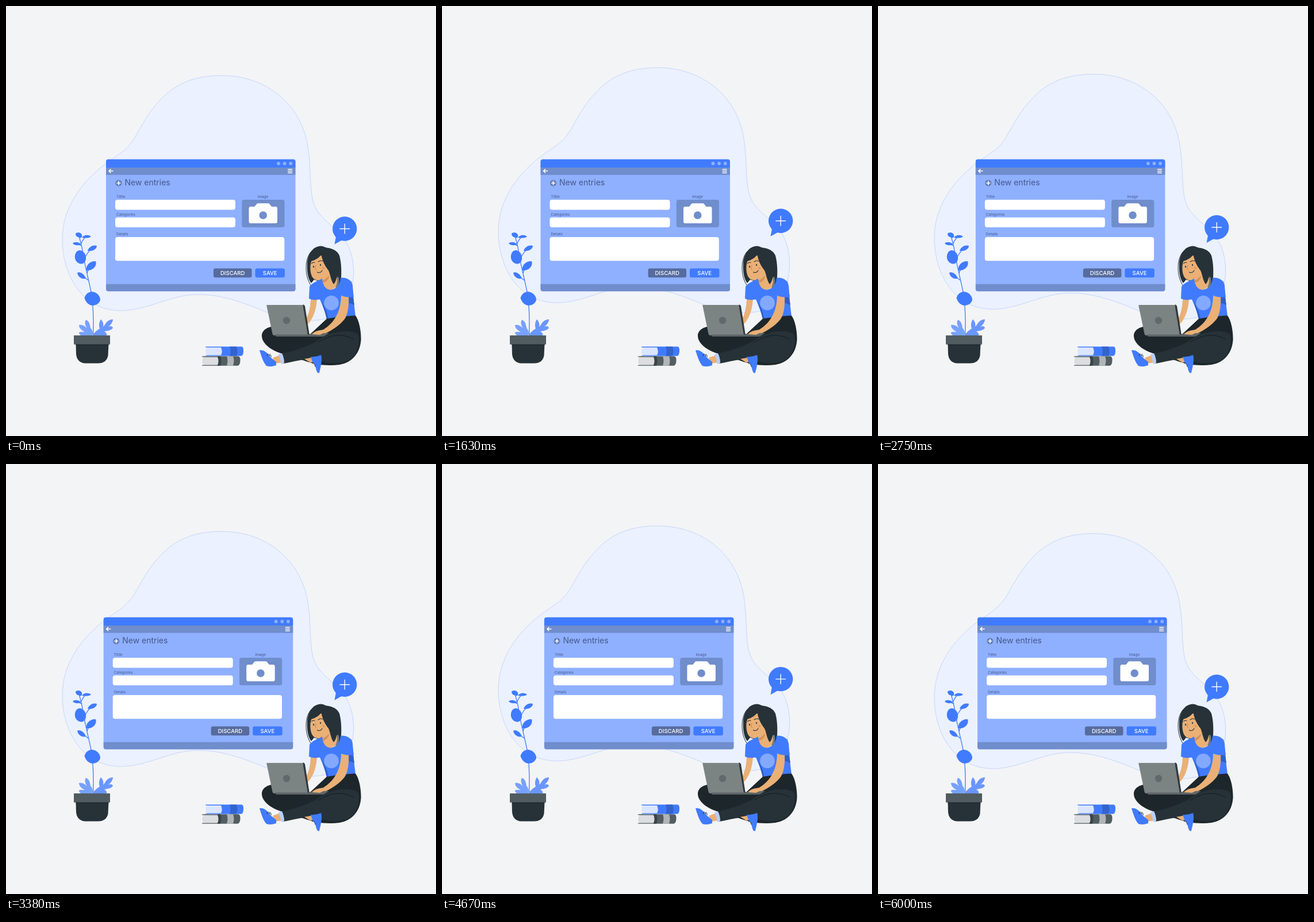
Animation, 748 px wide and 748 px high, one loop 6040 ms. Source, as an HTML page:

```html
<!DOCTYPE html>
<html lang="en">
<head>
<meta charset="utf-8">
<title>New entries</title>
<style>
html, body { margin: 0; width: 100%; height: 100%; overflow: hidden; background: #f3f4f6; }
svg { display: block; width: 100vw; height: 100vh; }
text { font-family: Inter, "Open Sans", sans-serif; }
.label { font-size: 6.4px; fill: #45578a; }
.button { font-size: 9.6px; fill: #fff; text-anchor: middle; font-weight: 500; }
.blue { fill: #407bff; }
.dark { fill: #263238; }
.skin { fill: #eab076; }
.slate { fill: #708dcc; }
.white { fill: #fff; }
.line { fill: none; stroke-linecap: round; stroke-linejoin: round; }
</style>
</head>
<body>
<svg viewBox="0 0 748 748">
  <ellipse cx="374" cy="626" rx="286" ry="16" fill="#f3f4f5"/>

  <path id="blob" fill="#ebf1fe" stroke="#a9c2fb" stroke-width=".6" d="M375 121C455 121 514 173 525 244C532 290 527 325 537 348C548 375 583 387 597 421C611 456 605 500 585 527C560 557 495 549 452 532C400 510 365 501 330 502C285 503 245 530 199 530C130 529 98 465 98 406C98 350 132 305 175 273C200 255 212 250 225 227C242 198 250 180 280 152C305 131 335 121 375 121Z"/>

  <g id="panel">
    <rect x="174" y="266.7" width="329.5" height="229.6" rx="4" fill="#8eb0ff"/>
    <path class="blue" d="M174 281V270.7Q174 266.7 178 266.7H499.5Q503.5 266.7 503.5 270.7V281Z"/>
    <g fill="#8eb0ff"><circle cx="474" cy="274" r="2.9"/><circle cx="484.6" cy="274" r="2.9"/><circle cx="495.2" cy="274" r="2.9"/></g>
    <path class="slate" d="M174 281H503.5V293.7H174ZM174 483.8H503.5V492.3Q503.5 496.3 499.5 496.3H178Q174 496.3 174 492.3Z"/>
    <path class="line" stroke="#fff" stroke-width="1.6" d="M186 287H179.5M182 284.2L179 287L182 289.8M490.8 284.2H497.5M490.8 287.2H497.5M490.8 290.2H497.5"/>
    <circle cx="196" cy="308" r="5.6" fill="#667fb9"/>
    <path class="line" stroke="#fff" stroke-width="1.7" d="M193.2 308H198.8M196 305.2V310.8"/>
    <text x="206.5" y="312.3" font-size="14" fill="#45578a">New entries</text>
    <text class="label" x="192" y="333.6">Tittle</text>
    <text class="label" x="192" y="364.8">Categories</text>
    <text class="label" x="192" y="398.7">Details</text>
    <text class="label" x="447" y="333.6" text-anchor="middle">Image</text>
    <g class="white">
      <rect x="190" y="337" width="209" height="17.4" rx="4"/>
      <rect x="190" y="367.8" width="209" height="17.2" rx="4"/>
      <rect x="190" y="402" width="294.3" height="41.2" rx="4"/>
    </g>
    <rect class="slate" x="410.3" y="337" width="74.2" height="48" rx="4"/>
    <path class="white" d="M425.5 349H432.5L436 344.5Q437 343.3 438.5 343.3H456Q457.5 343.3 458.5 344.5L462 349H469Q472 349 472 352V375Q472 378 469 378H425.5Q422.5 378 422.5 375V352Q422.5 349 425.5 349Z"/>
    <circle class="slate" cx="447.2" cy="364" r="6.8"/>
    <rect x="361" y="456.5" width="66.5" height="15.7" rx="3" fill="#566b9e"/>
    <rect class="blue" x="433.5" y="456.5" width="51.5" height="15.7" rx="3"/>
    <text class="button" x="394.2" y="467.8">DISCARD</text>
    <text class="button" x="459.2" y="467.8">SAVE</text>
  </g>

  <!-- plant -->
  <path class="line" stroke="#407bff" stroke-width="1.3" d="M151.5 574C152.500 548 152 520 148 497C144 477 138 455 135 437C133 422 130 410 127 400M131 413Q134 405 140 401M131 417L122 413M136 441Q141 428 150 422M141 465Q143 457 148 452M143 477Q138 473 131 468"/>
  <g class="blue">
    <path d="M121 396C123 393 130 393 132 398C133 402 131 404 128 403C124 402 121 400 121 396ZM132 403C135 398 143 397 148 401C145 404 138 404 132 403ZM116 413C119 409.500 127 410 131 415C126 417 119 416.500 116 413ZM142 426C144 418 153 415 158 417C158 423 151 427 142 426Z"/>
    <path d="M140 460C138 451 147 443 156 444C159 453 150 461 140 460ZM124 464C129 461 137 467 139 474C132 476 125 471 124 464Z"/>
    <path d="M127 425C134 424 140 432 139 440C138 447 133 450 128 448C122 446 119 440 120 434C121 429 123 426 127 425ZM136.500 508C139 499 147 495 154 498C160 500 164 506 164 511C163 517 157 521 150 521C144 520 139 516 136.500 508Z"/>
  </g>
  <path fill="#78a1ff" d="M150 574H131C129 572 127 570 126.500 568C130 566 134 567 137 567C131 564 127 560 127 555C133 554 138 557 141 561C138 556 136 550 139 546C145 548 146 554 147 560C150 563 152 568 150 574Z"/>
  <path fill="#6a96ff" d="M150 574C154 567 159 564 163 561C161 556 162 549 165 545C169 549 170 554 169 558C174 554 174 546 186 545C186 550 182 555 178 558C182 556 185 557 186 560C182 565 176 565 171 566C174 568 175 570 176 572C168 575 160 573 150 574Z"/>
  <path class="dark" d="M121.5 588H178.5L177.500 608Q175 621.5 160 621.5H138Q124 621 122 606Z"/>
  <rect x="118" y="573" width="63" height="15.7" fill="#515c61"/>
  <path d="M121.5 588.7H178.5V590H121.5Z" fill="#1d272c"/>

  <!-- books -->
  <g id="blueBook">
    <path class="blue" d="M347 592.5H410Q413.5 593 413 601Q412.5 608.5 409 608.8H347V607.7H349.5Q347.5 601 349.5 593.7H347Z"/>
    <path fill="#dae5ff" d="M349 594H374Q377.5 601 374 607.5H349Q347.5 601 349 594Z"/>
    <path fill="#3463cc" d="M389 592.5H401Q404 601 401 608.8H389Q392 601 389 592.5Z"/>
  </g>
  <g id="grayBook">
    <path fill="#535e62" d="M341 609.2H404Q408 609.5 407.5 617.5Q407 625.3 403 625.7H341V624.6H343.5Q341.5 618 343.5 610.4H341Z"/>
    <path fill="#dcdddf" d="M343 610.7H368Q371.5 618 368 624.4H343Q341.5 618 343 610.7Z"/>
    <path fill="#b1b5b7" d="M384 609.2H395Q398 617 395 625.7H384Q387 617 384 609.2Z"/>
    <path fill="#394448" d="M368 609.2H373Q376 617 373 625.7H368Q371.5 617 368 609.2Z"/>
  </g>

  <g id="bubble">
    <circle class="blue" cx="589.2" cy="387.5" r="21.2"/>
    <path class="blue" d="M574 401L571.5 414.5L585 407Z"/>
    <path class="line" stroke="#fff" stroke-width="1.4" d="M580.9 387.5H597.5M589.2 379.2V395.8"/>
  </g>

  <!-- hair, neck and face -->
  <path class="dark" d="M548 417.500C534 418 526 430 524 446C523 461 525 475 531 482L536 476L562 485C571 488 579 488 582 484C584 466 584 449 580 434C575 422 561 421 556 420Q552 417.500 548 417.500Z"/>
  <path class="line" stroke="#263238" stroke-width="1" d="M531 427C520 438 518 469 531 487"/>
  <path class="skin" d="M552 472L564 462L567 474L578 472L575 487Q565 499 551 491L547 480Z"/>
  <path fill="#d2935d" d="M549 477Q556 476 561 469L562 472Q558 481 550 482Z"/>
  <path class="skin" d="M533 439C528 448 528 466 534 473C540 480 555 479 561 469C567 470 571 460 567 456C565 454 562 457 561 459C558 452 552 445 550 434Q541 434 533 439Z"/>
  <path class="dark" d="M548 427C549 443 555 452 561 460C564 466 565 477 570 484C579 477 577 441 570 431C563 425 554 422 548 427ZM552 426C548 437 538 442 531 444L527 456C526 438 538 424 552 426Z"/>
  <path class="line" stroke="#263238" stroke-width="1.1" d="M531.5 448Q534 445 537 446.500M543 445Q547 441.500 551 444M541.500 463Q547 465.500 550 460"/>
  <g class="dark"><ellipse cx="535" cy="453.5" rx="1" ry="1.7"/><ellipse cx="547" cy="450.5" rx="1" ry="1.7"/></g>
  <path class="line" stroke="#c7834d" stroke-width="1" d="M539 451Q536.500 457 539.500 459"/>
  <circle cx="552" cy="456" r="2.3" fill="#e59b66"/>

  <!-- far arm, shirt -->
  <path class="skin" d="M530 507L541 509C540 524 537 538 528 550L520 559L520 548C527 537 530 522 530 507Z"/>
  <path class="blue" d="M528 488C533 481 543 478 550 474C551 492 564 500 576 488Q582 481 582 472.500C592 472 601 476 603 486L605 515L608 540C592 541 574 542 558 545Q554 528 546 510Q536 513 527 509Z"/>
  <path fill="#2f5ec9" d="M541 505L546 510Q555 528 558 545L561 544Q557 522 541 505ZM593 505L604 507L606 520L595 516Z"/>
  <path class="line" stroke="#737980" stroke-width="3.5" stroke-linecap="butt" d="M575 489Q579 481 577 473"/>
  <circle cx="566" cy="516.5" r="12.8" fill="#83a9ff"/>

  <!-- legs -->
  <path fill="#1d272b" d="M558 544C574 541 594 539 608 538.5C615 548 618 568 617.5 581C616 603 603 620 580 624C556 627 536 623 519 617L489 607C464 602 445 588 445 574C445 563 456 557 471 557C493 558 512 565 529 571Z"/>
  <path class="dark" d="M478 605C510 598 531 590 550 577C569 565 598 562 612 571C617 583 612 604 600 614C582 625 557 622 535 614C515 614 500 619 482 622Z"/>
  <path class="line" stroke="#131b1e" stroke-width="1" d="M556 558Q575 557 583 549M543 585Q575 564 604 579"/>

  <!-- near arm -->
  <path class="skin" d="M583 502L596 505C597 523 594 540 587 547C578 557 566 565 552 571L530 574C535 567 544 564 552 563C571 551 583 532 583 502Z"/>
  <path class="blue" d="M580 502C581 488 592 477 601 479L605 506Q590 508 580 502Z"/>

  <!-- laptop -->
  <path fill="#30393d" d="M516 519.5Q519 519 520 522L528 573H521Z"/>
  <path fill="#7c8483" d="M454 520H514Q516 520 516.5 522L525 573H467Q464 573 463.5 570L453.5 522Q453 520 454 520Z"/>
  <path fill="#5d6567" d="M468 571.5H527L535 569H562L555 573.5Q553 575 550 575H470Z"/>
  <path class="skin" d="M532 571Q538 564 550 564L557 567L546 572Z"/>
  <circle cx="488" cy="547" r="6.2" fill="#62696a"/>

  <!-- feet -->
  <path class="skin" d="M464 612L477 607L481 620L468 622ZM519 614L535 611L538 619L529 620Z"/>
  <path fill="#b9ceff" d="M474 606L480 604Q484 612 484 621L479 623Q478 614 474 606Z"/>
  <path class="blue" d="M441 599C449 597 455 604 460 611Q466 616 470 619V625C464 627 458 628 453 626C448 621 444 609 441 599ZM530 610Q539 611 548 607C551 615 547 630 545 638Q542 640 540 634Q538 624 533 619Z"/>
  <path class="line" stroke="#263238" stroke-width=".9" d="M455 609C452 604 458 604 459 609C457 604 462 605 461 611M533 622Q537 620 538 627"/>
</svg>
<script>
const LOOP = 6040, FPS = 24, BOB = 3000;
const sway = [[0, 0], [1125, -1], [2125, -4], [3375, -4.3], [4125, 5], [5250, 2.7], [6000, -1], [LOOP, -1]];
const [blob, bubble, panel] = ["blob", "bubble", "panel"].map(id => document.getElementById(id));

function swayAt(t) {
  const i = Math.max(1, sway.findIndex(([time]) => time >= t));
  const [t0, x0] = sway[i - 1], [t1, x1] = sway[i];
  const k = (t - t0) / (t1 - t0);
  return x0 + (x1 - x0) * k * k * (3 - 2 * k);
}

function draw() {
  const now = performance.now() % LOOP;
  const t = Math.floor((now + 5) * FPS / 1000) * 1000 / FPS;
  const lift = 15 * (1 - Math.abs(1 - (t % BOB) / (BOB / 2)));
  blob.setAttribute("transform", `translate(0 ${-lift})`);
  bubble.setAttribute("transform", `translate(0 ${-lift})`);
  panel.setAttribute("transform", `translate(${swayAt(Math.min(t, LOOP))} 0)`);
  requestAnimationFrame(draw);
}
draw();
</script>
</body>
</html>
```
